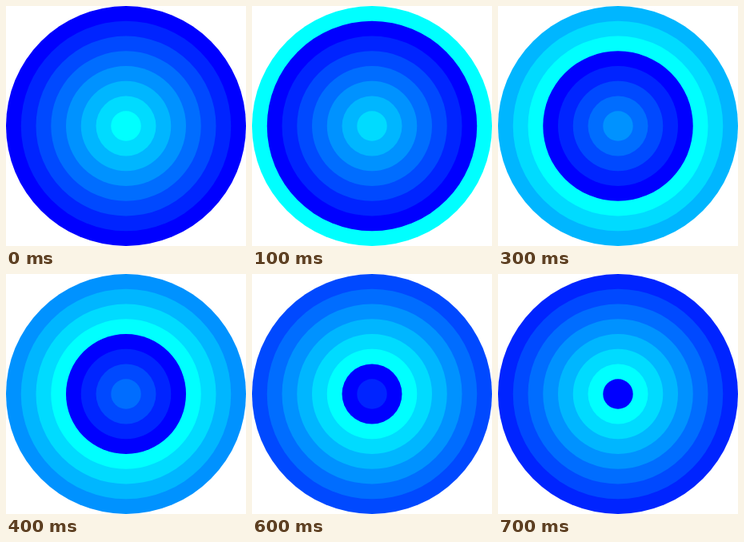
Animation of 300 by 300 pixels, one loop 800 ms. Source, as an HTML page:

```html
<!DOCTYPE html>
<html lang="en">
<head>
<meta charset="utf-8">
<title>Pulsing rings</title>
<style>
  html, body {
    margin: 0;
    width: 100%;
    height: 100%;
    overflow: hidden;
    background: #fff;
  }
  svg {
    display: block;
    width: 100vw;
    height: 100vh;
  }
  /* Each ring runs the same colour cycle, one step later than the ring outside it. */
  circle {
    animation: cycle 800ms step-end infinite;
    animation-delay: calc((var(--i) - 8) * 100ms);
  }
  @keyframes cycle {
    0%    { fill: rgb(0, 0, 255); }
    12.5% { fill: rgb(0, 255, 255); }
    25%   { fill: rgb(0, 219, 255); }
    37.5% { fill: rgb(0, 182, 255); }
    50%   { fill: rgb(0, 146, 255); }
    62.5% { fill: rgb(0, 109, 255); }
    75%   { fill: rgb(0, 73, 255); }
    87.5% { fill: rgb(0, 36, 255); }
    100%  { fill: rgb(0, 0, 255); }
  }
</style>
</head>
<body>
<svg viewBox="0 0 300 300">
  <circle cx="150" cy="150" r="150" style="--i:0"/>
  <circle cx="150" cy="150" r="131.25" style="--i:1"/>
  <circle cx="150" cy="150" r="112.5" style="--i:2"/>
  <circle cx="150" cy="150" r="93.75" style="--i:3"/>
  <circle cx="150" cy="150" r="75" style="--i:4"/>
  <circle cx="150" cy="150" r="56.25" style="--i:5"/>
  <circle cx="150" cy="150" r="37.5" style="--i:6"/>
  <circle cx="150" cy="150" r="18.75" style="--i:7"/>
</svg>
</body>
</html>
```
